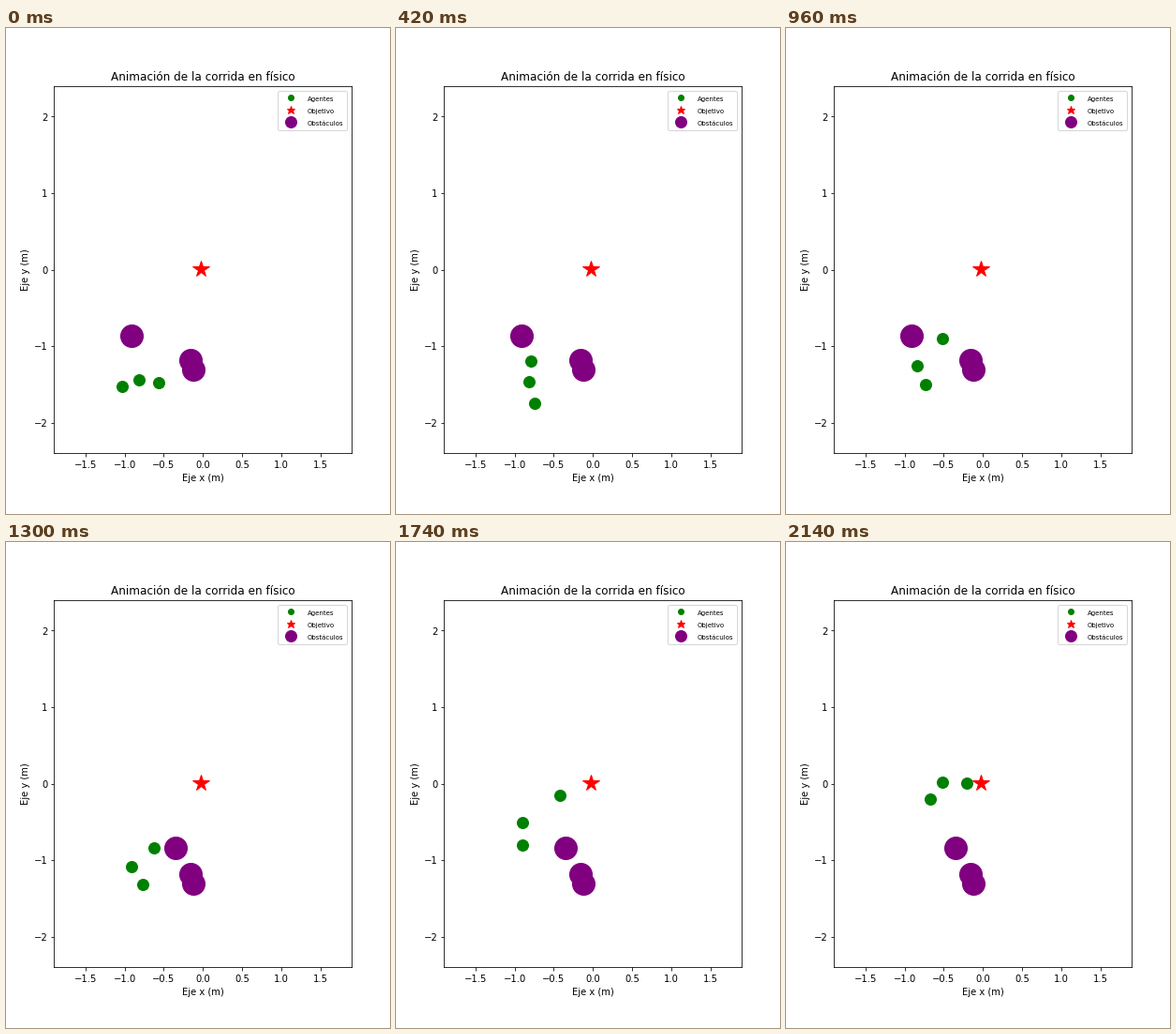
Animation, 410 px wide and 518 px high, one loop 2160 ms. Source, as a matplotlib script:

```python
import numpy as np
import matplotlib.pyplot as plt
from matplotlib.animation import FuncAnimation

STEP = 20
FRAMES = 108

# Key poses in metres, shared by all agents at these times (ms)
KEYS = np.array([0, 240, 620, 960, 1300, 1740, 2140])
LEADER = [(-1.03, -1.53), (-0.96, -1.32), (-0.59, -1.09), (-0.52, -0.9),
          (-0.62, -0.84), (-0.42, -0.15), (-0.21, 0.01)]
SECOND = [(-0.82, -1.44), (-0.79, -1.49), (-0.85, -1.4), (-0.84, -1.26),
          (-0.91, -1.09), (-0.9, -0.51), (-0.52, 0.02)]
THIRD = [(-0.57, -1.48), (-0.68, -1.72), (-0.79, -1.69), (-0.73, -1.5),
         (-0.77, -1.32), (-0.9, -0.8), (-0.67, -0.2)]

GOAL = (-0.025, 0.005)
FIXED = [(-0.16, -1.18), (-0.12, -1.31)]
MOVE_FROM, MOVE_TO = np.array([(-0.91, -0.86), (-0.35, -0.84)])
MOVE_START, MOVE_END = 980, 1220


def glide(poses, t):
    """Cubic Hermite curve through the key poses."""
    p = np.array(poses)
    v = np.gradient(p, KEYS, axis=0)
    i = min(np.searchsorted(KEYS, t, side="right"), len(KEYS) - 1) - 1
    h = KEYS[i + 1] - KEYS[i]
    u = (t - KEYS[i]) / h
    ease = u * u * (3 - 2 * u)
    return (p[i] + (p[i + 1] - p[i]) * ease
            + h * u * (1 - u) * (v[i] * (1 - u) - v[i + 1] * u))


def moved_obstacle(t):
    u = np.clip((t - MOVE_START) / (MOVE_END - MOVE_START), 0, 1)
    lift = 0.06 * np.sin(np.pi * u)
    return MOVE_FROM + (MOVE_TO - MOVE_FROM) * u * u * (3 - 2 * u) + (0, lift)


plt.rcParams["font.family"] = "DejaVu Sans"
fig, ax = plt.subplots(figsize=(5.7, 7.2), dpi=72)
fig.subplots_adjust(left=0.125, right=0.9, bottom=0.125, top=0.88)
ax.set(xlim=(-1.9, 1.9), ylim=(-2.4, 2.4),
       xticks=np.arange(-1.5, 1.6, 0.5), yticks=range(-2, 3),
       xlabel="Eje x (m)", ylabel="Eje y (m)")
ax.set_title("Animación de la corrida en físico")

agents, = ax.plot([], [], "o", color="green", ms=12, label="Agentes")
ax.plot(*GOAL, "*", color="red", ms=18, label="Objetivo")
obstacles, = ax.plot([], [], "o", color="purple", ms=24, label="Obstáculos")
legend = ax.legend(loc="upper right", markerscale=0.5)
plt.setp(legend.get_texts(), fontsize=7)


def update(k):
    t = k * STEP
    agents.set_data(*zip(*(glide(p, t) for p in (LEADER, SECOND, THIRD))))
    obstacles.set_data(*zip(moved_obstacle(t), *FIXED))
    return agents, obstacles


anim = FuncAnimation(fig, update, frames=FRAMES, interval=STEP,
                     repeat=True, repeat_delay=0)
plt.show()
```
